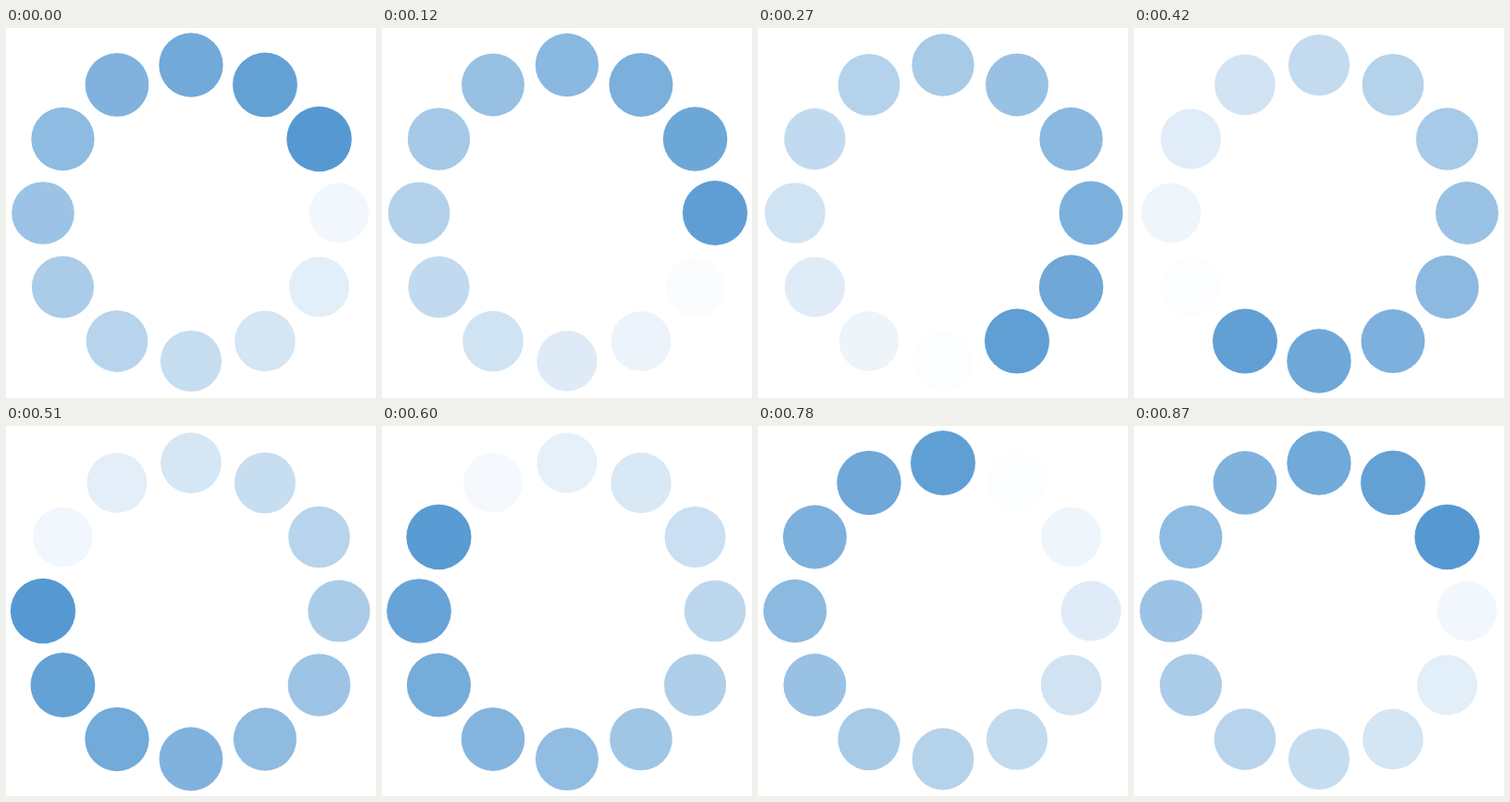
An HTML page that plays this animation: 400 by 400 pixels, repeating every 900 ms.

```html
<!DOCTYPE html>
<html lang="en">
<head>
<meta charset="utf-8">
<title>Spinner</title>
<style>
  html, body { margin: 0; width: 100%; height: 100%; overflow: hidden; background: #fff; }
  svg { display: block; width: 100%; height: 100%; }
</style>
</head>
<body>
<svg viewBox="0 0 400 400"><g id="ring" fill="#5699d2"></g></svg>
<script>
const COUNT = 12, RING = 160, RADIUS = 32, GROW = 0.1;
const LOOP = 900, TICK = 30, STEPS = LOOP / TICK - 1;
const ring = document.getElementById('ring');

const dots = Array.from({ length: COUNT }, (_, i) => {
  const dot = document.createElementNS('http://www.w3.org/2000/svg', 'circle');
  const angle = i * 2 * Math.PI / COUNT;
  dot.setAttribute('cx', 200 + RING * Math.cos(angle));
  dot.setAttribute('cy', 200 + RING * Math.sin(angle));
  return ring.appendChild(dot);
});

// The last tick of each loop holds the first pose, so a turn spans STEPS ticks.
function draw(ms) {
  const tick = Math.floor((ms % LOOP) / TICK + 0.001);
  const turn = (tick % STEPS) / STEPS;
  dots.forEach((dot, i) => {
    const age = (turn - (i + 1) / COUNT + 1) % 1;
    dot.setAttribute('r', RADIUS * (1 + GROW * (1 - age)));
    dot.setAttribute('opacity', 1 - age);
  });
}

function loop(now) {
  draw(now);
  requestAnimationFrame(loop);
}

draw(0);
requestAnimationFrame(loop);
</script>
</body>
</html>
```
